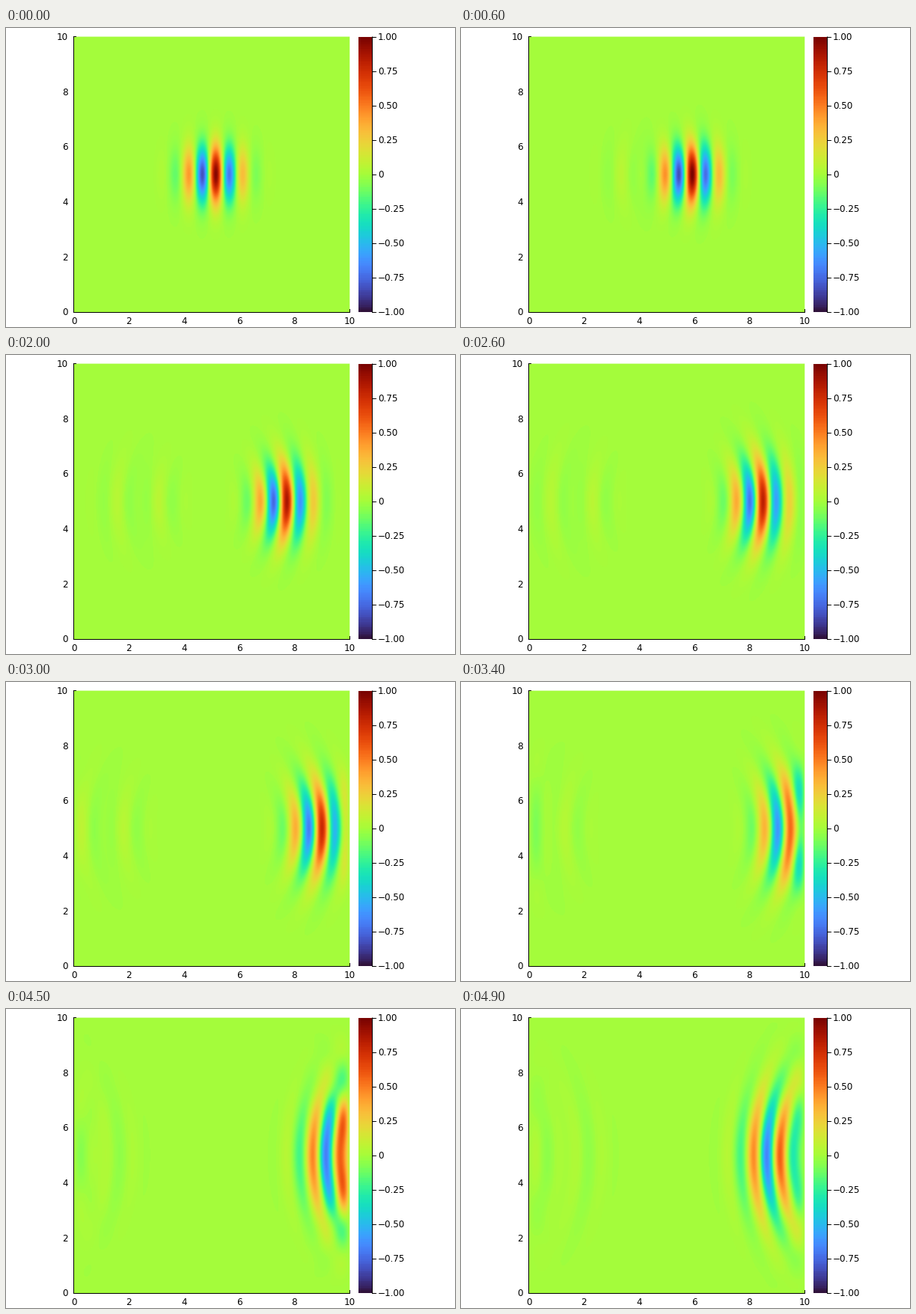
A matplotlib script for the animation above (5 s loop, 600x400 px).

```python
import numpy as np
import matplotlib.pyplot as plt
from matplotlib.animation import FuncAnimation
from matplotlib.patches import Rectangle

SIDE = 10.0          # square box with fixed walls, wave speed 1
WAVE_K = 2 * np.pi
STEP = 0.1262        # simulated time per frame
FRAMES = 50
MODES = np.arange(1, 65)
LEFT, RIGHT, TOP, BOTTOM = 91, 459, 12, 380
SCALE = 36.85        # pixels per unit
CMAP = plt.get_cmap("turbo").resampled(255)  # odd count keeps zero inside one bin


def sines(points):
    return np.sin(np.outer(points, MODES) * np.pi / SIDE)


# Expand the initial packet and its velocity in the standing modes of the box.
grid = np.arange(1, 256) * SIDE / 256
basis = sines(grid)
gx, gy = np.meshgrid(grid - 5, grid - 5)
envelope = np.exp(-gx**2 - gy**2)


def expand(field):
    return basis.T @ field @ basis * (2 / 256) ** 2


position = expand(envelope * np.cos(WAVE_K * gx))
velocity = expand(envelope * np.sin(WAVE_K * gx) * WAVE_K)
omega = np.hypot(*np.meshgrid(MODES, MODES)) * np.pi / SIDE

basis_x = sines((np.arange(LEFT, RIGHT) - LEFT) / SCALE)
basis_y = sines((BOTTOM - 0.5 - np.arange(TOP, BOTTOM)) / SCALE)


def wave(frame):
    t = (frame + 1) * STEP
    modes = position * np.cos(omega * t) + velocity * np.sin(omega * t) / omega
    return basis_y @ modes @ basis_x.T


plt.rcParams["font.family"] = "DejaVu Sans"
fig = plt.figure(figsize=(6, 4), dpi=100, facecolor="white")
ax = fig.add_axes([0, 0, 1, 1])
ax.axis("off")


def line(x0, y0, x1, y1):
    ax.plot([x0, x1], [y0, y1], color="black", lw=0.72, snap=False,
            solid_capstyle="butt", zorder=1)


def label(x, y, text, align):
    ax.text(x, y, text, fontsize=8.64, ha=align, va="baseline", color="black")


def picture(data, left, right):
    return ax.imshow(data, cmap=CMAP, vmin=-1, vmax=1, aspect="auto",
                     extent=(left, right, BOTTOM, TOP),
                     interpolation="nearest", zorder=2)


# Soft outer edge of the heatmap.
ax.add_patch(Rectangle((LEFT, TOP - 0.4), RIGHT - LEFT + 0.3,
                       BOTTOM - TOP + 0.4, color=CMAP(0.5), lw=0,
                       snap=False, zorder=0))
heat = picture(wave(0), LEFT, RIGHT)
picture(np.linspace(1, -1, 256)[:, None], 471, 489)

# Inward ticks lie under the heatmap, so only the outermost ones show.
line(90.5, 11.5, 90.5, 381)
line(90, 380.5, 460, 380.5)
line(90, 11.5, 94, 11.5)
line(459.5, 376, 459.5, 381)
for value in range(0, 11, 2):
    offset = value * SCALE
    label(90.5 + offset, 396, str(value), "center")
    label(83, 384.5 - offset, str(value), "right")

line(489.5, 11.5, 489.5, 380.5)
for value in np.linspace(-1, 1, 9):
    y = 196 - 184 * value
    line(489, np.floor(y) + 0.5, 495, np.floor(y) + 0.5)
    text = f"{value:.2f}".replace("-", "\u2212") if value else "0"
    label(497, y + 4, text, "left")

ax.set_xlim(0, 600)
ax.set_ylim(400, 0)


def update(frame):
    heat.set_data(wave(frame))
    return [heat]


anim = FuncAnimation(fig, update, frames=FRAMES, interval=100, repeat=True,
                     repeat_delay=0)
plt.show()
```
